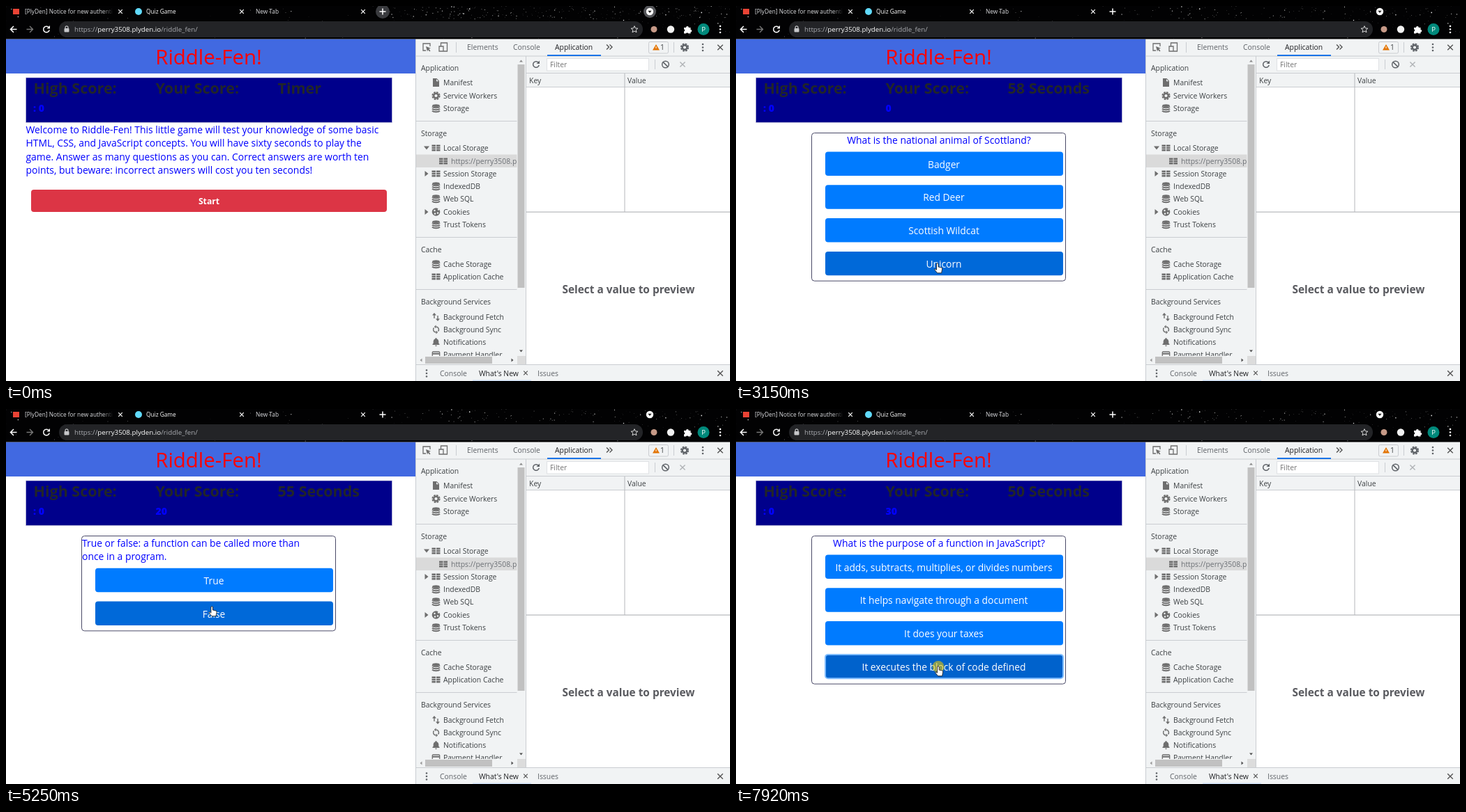
An HTML page for the animation above (7.99 s loop, 1038x539 px).

```html
<!DOCTYPE html>
<html lang="en">
<head>
<meta charset="utf-8">
<title>Quiz Game</title>
<style>
html, body { margin: 0; width: 100%; height: 100%; overflow: hidden; background: #fff; }
svg { display: block; }
text { font-family: "Open Sans", "Noto Sans", sans-serif; white-space: pre; }
</style>
</head>
<body>
<svg id="stage" width="1038" height="539" viewBox="0 0 1038 539"></svg>
<script>
const LOOP = 7990;
const BLUE = '#0000ff', GREY = '#6e6e6e', INK = '#3c4043', PANEL = '#f1f3f4', LINE = '#cacdd1';

// SVG string helpers
const rect = (x, y, w, h, fill, more = '') =>
  `<rect x="${x}" y="${y}" width="${w}" height="${h}" fill="${fill}" ${more}/>`;
const text = (x, y, str, size, fill, more = '') =>
  `<text x="${x}" y="${y}" font-size="${size}" fill="${fill}" ${more}>${str}</text>`;
const disc = (x, y, r, fill, more = '') => `<circle cx="${x}" cy="${y}" r="${r}" fill="${fill}" ${more}/>`;
const shape = (x, y, d, fill, more = '') =>
  `<path transform="translate(${x} ${y})" d="${d}" fill="${fill}" ${more}/>`;
const stroke = (x, y, d, color, width = 1.4) =>
  shape(x, y, d, 'none', `stroke="${color}" stroke-width="${width}"`);
const cross = (x, y, r, color, width) => stroke(x, y, `M${-r} ${-r}L${r} ${r}M${r} ${-r}L${-r} ${r}`, color, width);
const dots = (x, y, color) => [-4.5, 0, 4.5].map(d => disc(x, y + d, 1.3, color)).join('');
const reload = (x, y, color) =>
  stroke(x, y, 'M3.4-2.6A4.3 4.3 0 1 0 4.2 1', color, 1.5) + shape(x, y, 'M5-5.5v4.5H.5z', color);
const MIDDLE = ' text-anchor="middle"', BOLD = ' font-weight="700"';

const icons = {
  file: (x, y) => shape(x, y, 'M-4.5-6h5.5l3.5 3.5v8.5h-9z', GREY) + shape(x, y, 'M.5-5v3.2h3.2z', PANEL),
  gear: (x, y, c = GREY) => disc(x, y, 3.3, 'none', `stroke="${c}" stroke-width="2.4"`) +
    disc(x, y, 5.2, 'none', `stroke="${c}" stroke-width="1.8" stroke-dasharray="2.7 1.38"`),
  store: (x, y) => `<ellipse cx="${x}" cy="${y - 3.8}" rx="5.5" ry="2" fill="${GREY}"/>` +
    [-2.4, .6, 3.6].map(d => stroke(x, y + d, 'M-5.5 0q1.5 1.7 5.5 1.7t5.5-1.7', GREY, 2)).join(''),
  grid: (x, y) => [-4.6, -1.3, 2].map(d => shape(x, y + d, 'M-6 0h5.5v2.6h-5.5zM.5 0h5.5v2.6h-5.5z', GREY)).join(''),
  cookie: (x, y) => disc(x, y, 5.8, GREY) +
    [[-2, -2], [2.5, 1.5], [-1.5, 2.5], [3.5, -3.5]].map(([a, b]) => disc(x + a, y + b, 1.2, PANEL)).join(''),
  fetch: (x, y) => stroke(x, y, 'M-2.5 2v-6M2.5-2v6', GREY) + shape(x, y, 'M-5.5-2.5l3-3.5 3 3.5zM-.5 2.5l3 3.5 3-3.5z', GREY),
  sync: (x, y) => stroke(x, y, 'M0-4A4 4 0 0 1 3 2.6M0 4A4 4 0 0 1-3-2.6', GREY, 1.5) +
    shape(x, y, 'M0-6.5v5l-2.6-2.5zM0 6.5v-5l2.6 2.5z', GREY),
  bell: (x, y) => shape(x, y, 'M-5 4v-1l1.2-1.2v-3q.3-3 2.8-3.6v-1h2v1q2.5.6 2.8 3.6v3l1.2 1.2v1zM-1.4 4.8h2.8q-.3 1.4-1.4 1.4t-1.4-1.4z', GREY),
  card: (x, y) => rect(x - 5.2, y - 4, 10.4, 8, 'none', `rx="1" stroke="${GREY}" stroke-width="1.3"`) + rect(x - 5, y - 2.2, 10, 2, GREY)
};

// Browser bar
let seed = 11;
const rnd = () => (seed = (seed * 16807) % 2147483647) / 2147483647;
const stars = (n, x, w, h) => Array.from({ length: n }, () =>
  disc((x + w * rnd()).toFixed(1), (h * rnd()).toFixed(1), (.25 + .6 * rnd() ** 2).toFixed(2), '#fff',
    `opacity="${(.2 + .7 * rnd()).toFixed(2)}"`)).join('');

function browserBar() {
  const pale = '#dcdde0';
  return rect(0, 0, 1038, 47.5, '#020203') + stars(130, 0, 1038, 47) + stars(110, 550, 488, 19) +
    `<g id="glow">${stars(130, 550, 488, 19)}${disc(540, 8, 10, '#3a3b3f')}${disc(923, 8, 9, '#55565a')}</g>` +
    rect(76, 22, 837, 23, '#232427', 'rx="11.5"') +
    `<linearGradient id="fade" gradientUnits="userSpaceOnUse" x1="138" x2="154"><stop stop-color="${pale}"/><stop offset="1" stop-color="${pale}" stop-opacity="0"/></linearGradient>` +
    rect(10, 4, 9, 8, '#ea4335') + text(27, 11, '[PlyDen] Notice for new authenti', 8.3, 'url(#fade)') +
    disc(190, 8, 5, '#61dafb') + text(201, 11, 'Quiz Game', 8.3, '#fff') + text(358, 11, 'New Tab', 8.3, pale) +
    [164, 338, 512].map(x => cross(x, 8, 2.8, '#fff', 1.2)).join('') +
    stroke(540, 8, 'M-4.5 0h9M0-4.5v9', '#fff', 1.5) +
    disc(923, 8, 5.2, '#fff') + shape(923, 8, 'M-2.6-1.2h5.2l-2.6 3.2z', '#222') +
    stroke(11, 33.5, 'M4.5 0h-9M0-4.5l-4.5 4.5 4.5 4.5', '#fff', 1.5) +
    stroke(34, 33.5, 'M-4.5 0h9M0-4.5l4.5 4.5-4.5 4.5', '#777', 1.4) + reload(58, 33.5, '#fff') +
    rect(83.5, 32, 7, 5.6, '#c6c7ca', 'rx="1"') + stroke(87, 32, 'M-2 .5v-1.6a2 2 0 0 1 4 0v1.6', '#c6c7ca', 1.2) +
    text(98, 37, 'https://<tspan fill="#fff">perry3508.plyden.io</tspan>/riddle_fen/', 9.76, '#a9abb0') +
    stroke(901, 33.5, 'M0-4.8l1.4 3.2 3.4.3-2.6 2.3.8 3.4-3-1.8-3 1.8.8-3.4-2.6-2.3 3.4-.3z', '#ddd', 1) +
    disc(929, 33.5, 4.5, '#c79a88') + disc(953, 33.5, 5.2, '#f2f2f2') +
    shape(977, 34, 'M-5-3h3a1.9 1.9 0 1 1 3.8 0h2.7v3a1.8 1.8 0 1 1 0 3.6v2h-3.2a1.8 1.8 0 0 0-3.4 0h-2.9v-3a1.8 1.8 0 0 0 0-3.4z', '#fff') +
    disc(1000, 33.5, 8.5, '#00897b') + text(1000, 37, 'P', 9.5, '#fff', MIDDLE) + dots(1024, 33.5, '#fff');
}

// Developer tools
const label = (x, y, str, fill = INK) => text(x, y + 3.7, str, 10.4, fill);

function devTools() {
  const rows = [
    ['file', 110, 'Manifest'], ['gear', 129, 'Service Workers'], ['store', 147, 'Storage'],
    ['grid', 204, 'Local Storage'], ['grid', 241, 'Session Storage'], ['store', 259, 'IndexedDB'],
    ['store', 277, 'Web SQL'], ['cookie', 296, 'Cookies'], ['store', 314, 'Trust Tokens'],
    ['store', 371, 'Cache Storage'], ['grid', 389, 'Application Cache'], ['fetch', 447, 'Background Fetch'],
    ['sync', 465, 'Background Sync'], ['bell', 483, 'Notifications'], ['card', 501, 'Payment Handler']
  ];
  const heads = [[89, 'Application'], [183, 'Storage'], [350, 'Cache'], [425, 'Background Services']];
  const sidebar = rect(588, 213.5, 145, 18.5, '#dadada') + label(638, 223, 'https://perry3508.p', '#6b6f74') +
    `<g id="site">${icons.grid(627, 223)}</g>` +
    heads.map(([y, s]) => label(595, y, s)).join('') +
    rows.map(([i, y, s]) => icons[i](616.5, y) + label(627, y, s)).join('') +
    [165, 332, 407].map(y => rect(588, y, 145, 1, LINE)).join('') +
    shape(603, 204, 'M-4-2.5h8l-4 5z', GREY) +
    [241, 296].map(y => shape(603, y, 'M-2.5-4v8l5-4z', GREY)).join('');
  const scrollbars = rect(732.5, 72, 12.5, 443, PANEL) + rect(733.5, 84, 10, 321, '#c1c1c1') +
    shape(738.5, 79, 'M-2.5 1.5h5l-2.5-3z', '#8a8a8a') + shape(738.5, 496, 'M-2.5-1.5h5l-2.5 3z', '#505050') +
    rect(588, 503, 145, 12, PANEL) + rect(601, 504, 96, 10, '#c1c1c1') + rect(733, 503, 12, 12, '#dcdcdc') +
    shape(595, 509, 'M1.5-2.5v5l-3-2.5z', '#9a9a9a') + shape(726, 509, 'M-1.5-2.5v5l3-2.5z', '#505050');
  const topBar = rect(588, 48, 450, 24, PANEL) + rect(588, 71.5, 450, 1, LINE) +
    stroke(603, 59, 'M5-1v-4h-10v10h4', GREY, 1.3) + shape(603, 59, 'M-1-1l7 2.8-2.8 1 2.3 2.5-1.2 1.2-2.3-2.5-1 2.5z', GREY) +
    stroke(627, 59, 'M-3.5-1v-5h9v12h-5M-6-1h6v7h-6z', GREY, 1.3) + rect(645, 52, 1, 15, LINE) +
    label(661, 59.5, 'Elements', '#5f6368') + label(727, 59.5, 'Console', '#5f6368') +
    label(787, 59.5, 'Application', '#202124') + rect(776, 70, 77, 2, '#1a73e8') +
    stroke(865, 59, 'M-4-3.5l3.5 3.5-3.5 3.5M.5-3.5l3.5 3.5-3.5 3.5', '#555') +
    rect(921.5, 51.5, 28, 16.5, PANEL, `rx="2" stroke="${LINE}"`) +
    shape(932, 59.5, 'M0-4.5l5 8.5h-10z', '#e37400') + rect(931.5, 58, 1, 3, '#fff') + label(938, 59.5, '1') +
    rect(957, 52, 1, 15, LINE) + icons.gear(973, 59.5, '#5f6368') + dots(999, 59.5, '#5f6368') + cross(1024, 59.5, 3.8, '#555');
  const table = rect(745, 72, 293, 444, '#fff') + rect(745, 72, 293, 44.5, PANEL) + rect(745, 96, 293, 1, LINE) +
    rect(745, 72, 1, 444, LINE) + reload(760, 84, '#5f6368') +
    rect(775.5, 75.5, 146, 17.5, '#fff', 'stroke="#dfe1e4"') + label(780, 84.5, 'Filter', '#757575') +
    rect(930, 77, 1, 14, LINE) + disc(945.5, 84, 4.8, 'none', 'stroke="#5f6368" stroke-width="1.5"') +
    stroke(945.5, 84, 'M-3.4-3.4L3.4 3.4', '#5f6368', 1.5) + cross(970, 84, 3.6, '#b0b3b6') +
    label(750, 107, 'Key') + label(891, 107, 'Value') + rect(746, 116, 292, 1, LINE) +
    rect(886.5, 97, 1, 199, '#b5b8bb') + rect(746, 295.5, 292, 1.2, '#b5b8bb') +
    text(892.5, 412.5, 'Select a value to preview', 15.4, '#5a5b60', MIDDLE + BOLD);
  const drawer = rect(588, 515, 450, 24, PANEL) + rect(588, 515, 450, 1, LINE) + dots(603, 528, '#5f6368') +
    label(622, 528, 'Console', '#5f6368') + label(678, 528, "What's New", '#202124') + cross(745, 527.5, 2.8, '#555', 1.2) +
    label(762, 528, 'Issues', '#5f6368') + rect(669, 537.5, 84, 1.5, '#cfe0f7') + cross(1024, 528, 3.8, '#555');
  return rect(588, 48, 158, 491, PANEL) + sidebar + scrollbars + table + topBar + drawer + rect(587, 47.5, 1, 492, LINE);
}

// Quiz scenes
const scenes = [
  { from: 0, score: '' },
  { from: 1460, score: 0, ask: ['What is the national animal of Scottland?'],
    answers: ['Badger', 'Red Deer', 'Scottish Wildcat', 'Unicorn'] },
  { from: 3430, score: 10, ask: ['True or false: it is possible for a function to contain', 'another function.'],
    answers: ['True', 'False'] },
  { from: 4670, score: 20, ask: ['True or false: a function can be called more than', 'once in a program.'],
    answers: ['True', 'False'] },
  { from: 5450, score: 30, ask: ['What is the purpose of a function in JavaScript?'],
    answers: ['It adds, subtracts, multiplies, or divides numbers', 'It helps navigate through a document',
      'It does your taxes', 'It executes the block of code defined'] }
];
const intro = ['Welcome to Riddle-Fen! This little game will test your knowledge of some basic',
  'HTML, CSS, and JavaScript concepts. You will have sixty seconds to play the',
  'game. Answer as many questions as you can. Correct answers are worth ten',
  'points, but beware: incorrect answers will cost you ten seconds!'];

const button = b => rect(b.x, b.y, b.w, b.h, '#fff', 'class="button" rx="4"');
const lines = (list, x, y, more) => list.map((l, i) => text(x, y + 19.3 * i, l, 13.9, BLUE, more)).join('');

function drawScene(s) {
  if (!s.ask) {
    s.buttons = [{ x: 36, y: 264, w: 510, h: 32 }];
    return lines(intro, 28.5, 183) + button(s.buttons[0]) + text(291, 284.5, 'Start', 12.2, '#fff', MIDDLE + BOLD);
  }
  const top = 209.5 + 19.3 * (s.ask.length - 1);
  s.buttons = s.answers.map((_, i) => ({ x: 128, y: top + 47.8 * i, w: 341, h: 34.4 }));
  return rect(108.5, 182.5, 364, top - 188 + 47.8 * s.answers.length, '#fff', 'rx="4" stroke="#4a4a68"') +
    (s.ask.length > 1 ? lines(s.ask, 109, 198) : lines(s.ask, 291, 198, MIDDLE)) +
    s.buttons.map((b, i) => button(b) + text(298, b.y + 23, s.answers[i], 13.8, '#fff', MIDDLE)).join('');
}

const heading = (x, str, id = '') => text(x, 126, str, 21.5, '#212529', BOLD + id);
const value = (x, str, id = '') => text(x, 152, str, 14, BLUE, 'font-weight="800"' + id);

document.getElementById('stage').innerHTML =
  rect(0, 0, 1038, 539, '#fff') + rect(0, 47.5, 587, 49.5, '#4169e1') +
  text(290.5, 84, 'Riddle-Fen!', 29.4, '#f00', MIDDLE + ' font-weight="500"') +
  rect(28.5, 103, 525, 64.5, '#00008b', 'stroke="#c8c8dc" stroke-width=".6"') +
  heading(39.5, 'High Score:') + heading(214.5, 'Your Score:') + heading(389.5, '', ' id="timer"') +
  value(39, ': 0') + value(214.5, '', ' id="score"') +
  scenes.map(s => `<g class="scene">${drawScene(s)}</g>`).join('') +
  devTools() + browserBar() +
  `<g id="cursor">${disc(0, .5, 8.5, '#ebc800', 'id="press" opacity=".58"')}` +
  `<path id="pointer" fill="#fff" stroke="#222" stroke-width=".9" stroke-linejoin="round"/></g>`;

const $ = id => document.getElementById(id);
const groups = [...document.querySelectorAll('.scene')];
const rects = groups.map(g => [...g.querySelectorAll('.button')]);
const show = (el, on) => el.setAttribute('visibility', on ? 'visible' : 'hidden');

// Mouse: time, x, y of the hot spot
const path = [[0, 1010, 560], [90, 997, 539], [400, 620, 420], [800, 300, 294], [1200, 288, 282], [1480, 288, 282],
  [1800, 286, 292], [2100, 281, 333], [2180, 280, 340.5], [2420, 280, 342], [2700, 286, 362], [3000, 289, 370],
  [3450, 289, 370], [3700, 291, 279], [3770, 292, 271], [3950, 303, 246], [4200, 306, 241], [4680, 306, 241],
  [4920, 300, 274], [5150, 296, 284], [5500, 294, 284], [5800, 262, 274], [6010, 239, 258], [6200, 238, 266],
  [6500, 250, 316], [6700, 262, 330], [7100, 282, 366], [7350, 290, 370], [LOOP, 290, 370]];
const presses = [[1320, 1450], [3180, 3420], [4450, 4660], [5260, 5440], [7650, LOOP]];
const HAND = 'M-1.5 1a1.3 1.3 0 0 1 2.6 0v4l4.6 1q1.3.4 1 2l-.8 4q-.2 1-.2 1.8h-6l-3.8-4.6q-.6-1.6 1-1.2l1.6 1.2z';
const ARROW = 'M0 0v11l2.6-2.4 1.7 3.8 1.6-.7-1.7-3.7h3.4z';

function mouse(t) {
  const i = Math.max(1, path.findIndex(p => p[0] >= t));
  const [a, b] = [path[i - 1], path[i]];
  const u = (t - a[0]) / (b[0] - a[0]);
  return [a[1] + (b[1] - a[1]) * u, a[2] + (b[2] - a[2]) * u];
}
const inside = (b, [x, y], pad = 0) => x >= b.x && x <= b.x + b.w && y >= b.y - pad && y <= b.y + b.h + pad;

// Share of the last 150 ms spent over a button, as a colour transition
function hover(b, t) {
  let n = 0;
  for (let k = 0; k < 10; k++) n += inside(b, mouse(Math.max(0, t - 15 * k)));
  return n / 10;
}
const mix = (a, b, u) => `rgb(${a.map((v, i) => Math.round(v + (b[i] - v) * u))})`;

function render(t) {
  const now = scenes.findLastIndex(s => t >= s.from);
  const scene = scenes[now], at = mouse(t);
  const pressed = presses.some(([a, b]) => t >= a && t < b);
  groups.forEach((g, i) => show(g, i === now));
  scene.buttons.forEach((b, i) => {
    const el = rects[now][i], held = now > 0 && pressed && inside(b, at), u = hover(b, t);
    el.setAttribute('fill', held ? '#0062cc' : now ? mix([0, 123, 255], [0, 105, 217], u) : mix([220, 53, 69], [200, 35, 51], u));
    el.setAttribute('stroke', held ? '#80bdff' : 'none');
    el.setAttribute('stroke-width', 2);
  });
  $('score').textContent = scene.score;
  $('timer').textContent = t < 2120 ? 'Timer' : 59 - Math.floor((t - 2120) / 635) + ' Seconds';
  show($('glow'), now === 0);
  show($('site'), t < 500 || now > 0);
  show($('press'), pressed);
  $('pointer').setAttribute('d', scene.buttons.some(b => inside(b, at, 3)) ? HAND : ARROW);
  $('cursor').setAttribute('transform', `translate(${at[0].toFixed(1)} ${at[1].toFixed(1)})`);
}

const start = performance.now();
function frame() {
  render(Math.max(0, performance.now() - start) % LOOP);
  requestAnimationFrame(frame);
}
frame();
</script>
</body>
</html>
```
